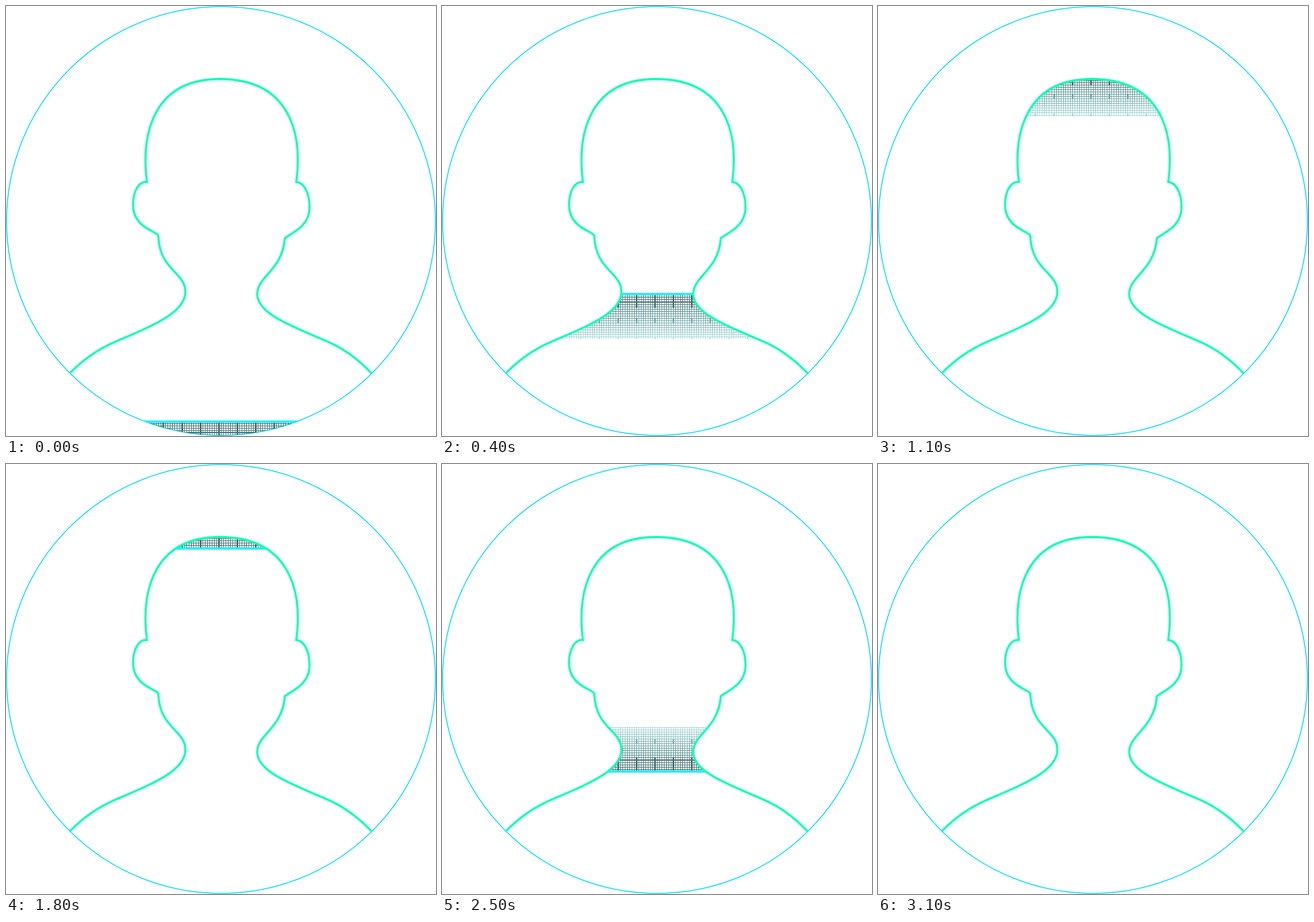
These frames come from a looping animation (748x748 px, 3600 ms). An HTML page with a canvas:

```html
<!DOCTYPE html>
<html lang="en">
<head>
<meta charset="utf-8">
<title>Body scan</title>
<style>
  html, body { margin: 0; width: 100%; height: 100%; overflow: hidden; background: #fff; }
  canvas { display: block; }
</style>
</head>
<body>
<canvas id="stage" width="748" height="748"></canvas>
<script>
const ctx = document.getElementById('stage').getContext('2d');
const SIZE = 748, LOOP = 3600, STEP = 100, SPEED = 0.554;
const TAIL = 78, DARK_TAIL = 24;
const GRID = { x: 16, y: 27, pitchX: 32.17, pitchY: 32.5, cells: 8 };

const bodyLine =
  'M111 639C133 616 160 597 190 584C250 558 312 535 312 497' +
  'C312 463 268 460 265 402Q265 398 263 397C252 389 221 381 221 346' +
  'C221 322 231 305 245 306C234 216 260 127 372 127' +
  'C490 127 517 216 505 306C517 307 528 323 528 350' +
  'C528 384 497 394 485 404C481 460 437 470 437 501' +
  'C437 536 500 558 560 584C590 597 616 618 636 639';
const outline = new Path2D(bodyLine);
const silhouette = new Path2D(bodyLine + 'L748 748L0 748Z');
const circle = new Path2D();
circle.arc(374, 374, 373, 0, Math.PI * 2);

// Calls draw(position, index) for evenly spaced lines across the stage.
function repeat(start, pitch, draw) {
  for (let i = 0, p = start; p < SIZE; p = start + ++i * pitch) draw(Math.round(p), i);
}

function clipBand(y, dir, length) {
  ctx.beginPath();
  ctx.rect(0, dir > 0 ? y : y - length, SIZE, length);
  ctx.clip();
}

function drawGrid(y, dir) {
  const { x: x0, y: y0, pitchX, pitchY, cells } = GRID;
  ctx.save();
  clipBand(y, dir, TAIL);
  const fade = ctx.createLinearGradient(0, y, 0, y + dir * TAIL);
  fade.addColorStop(0, '#3f5c5f');
  fade.addColorStop(0.45, '#5d979b');
  fade.addColorStop(1, '#aedde0');
  ctx.fillStyle = fade;
  repeat(x0, pitchX / cells, x => ctx.fillRect(x, 0, 1, SIZE));
  repeat(y0, pitchY / cells, row => ctx.fillRect(0, row, SIZE, 1));
  repeat(x0, pitchX, x => repeat(y0, pitchY, row => {
    ctx.fillRect(x - 1, row - 3, 3, 7);
  }));

  clipBand(y, dir, DARK_TAIL);
  ctx.fillStyle = '#466f73';
  repeat(x0, pitchX, x => ctx.fillRect(x - 1, 0, 3, SIZE));
  repeat(y0, pitchY, row => ctx.fillRect(0, row - 1, SIZE, 2));
  ctx.restore();
}

function scanAt(time) {
  return time < 1500
    ? { y: 723 - SPEED * time, dir: 1 }
    : { y: 147 + SPEED * (time - 1800), dir: -1 };
}

function stroke(path, color, width) {
  ctx.strokeStyle = color;
  ctx.lineWidth = width;
  ctx.stroke(path);
}

function draw(now) {
  const time = Math.floor((now % LOOP) / STEP) * STEP;
  const { y, dir } = scanAt(time);
  const barY = Math.round(y);

  ctx.fillStyle = '#fff';
  ctx.fillRect(0, 0, SIZE, SIZE);
  stroke(circle, '#00d9ff', 1.6);

  ctx.save();
  ctx.clip(circle);
  ctx.clip(silhouette);
  drawGrid(barY, dir);
  ctx.fillStyle = '#1ff0ff';
  ctx.fillRect(0, barY - 2, SIZE, 4);
  ctx.restore();

  ctx.save();
  ctx.clip(circle);
  stroke(outline, '#14ffb9', 3.8);
  ctx.restore();
}

const startTime = performance.now();
function tick() {
  draw(performance.now() - startTime);
  requestAnimationFrame(tick);
}
tick();
</script>
</body>
</html>
```
